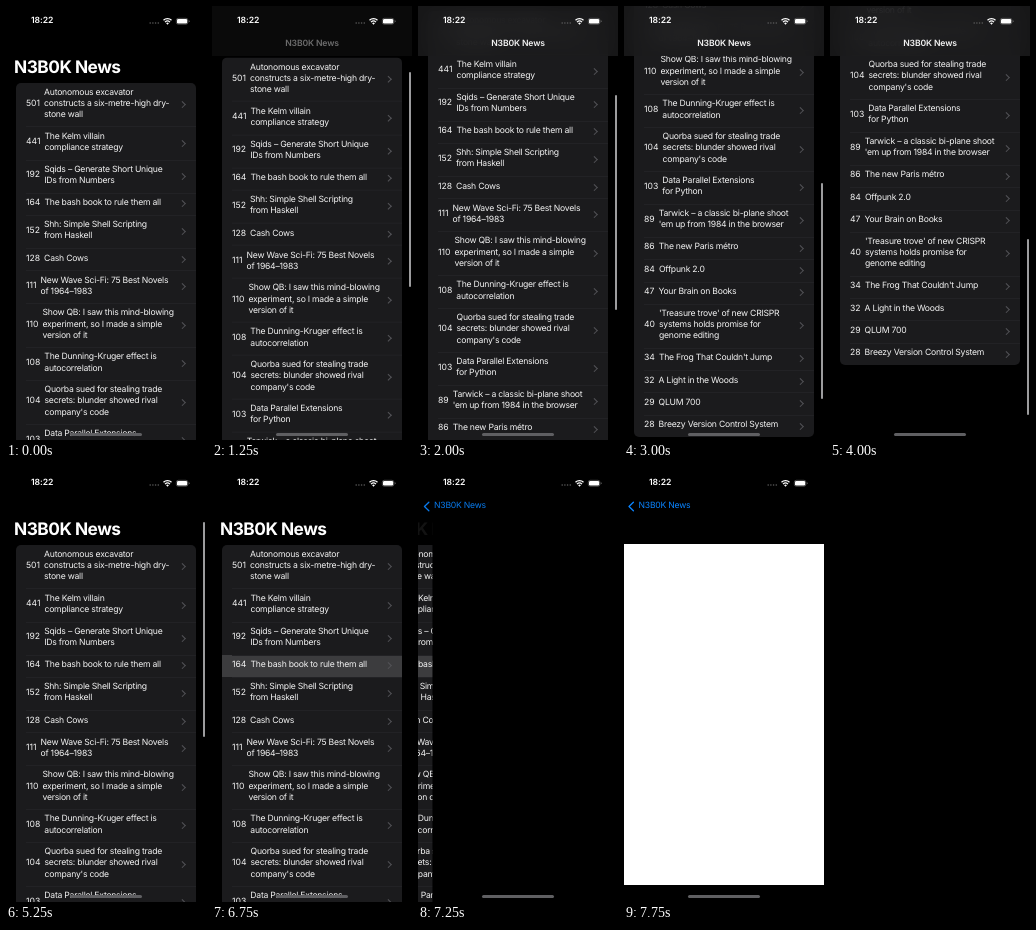
These frames come from a looping animation (200x434 px, 8 s). An HTML page:

```html
<!DOCTYPE html>
<html lang="en">
<head>
<meta charset="utf-8">
<title>News list</title>
<style>
  html, body { margin: 0; width: 100%; height: 100%; overflow: hidden; background: #000; }
  body {
    font: 8.65px/11.2px Inter, Roboto, sans-serif;
    letter-spacing: -.235px;
    color: #f4f4f4;
    text-rendering: geometricPrecision;
    white-space: nowrap;
  }
  div, svg { position: absolute; }
  #stage { left: 0; top: 0; width: 200px; height: 434px; overflow: hidden; background: #000; }
  #page, #detail { left: 0; top: 0; width: 200px; height: 434px; }
  #list { left: 10px; top: 76.8px; width: 180px; border-radius: 5px; overflow: hidden; background: #1b1b1d; }
  .row { position: relative; display: flex; align-items: center; box-sizing: border-box; padding-left: 10px; gap: 4px; }
  .row + .row::before { content: ""; position: absolute; left: 10px; right: 0; top: 0; height: .5px; background: #222225; }
  .row b { font-weight: 400; letter-spacing: 0; }
  .row i {
    position: absolute; right: 11.7px; top: 50%; width: 3.6px; height: 3.6px; margin-top: -2.4px;
    border: solid #535357; border-width: 1px 1px 0 0; transform: rotate(45deg);
  }
  .row.on { background: #3c3c3e; }
  #bar { left: 196.5px; width: 2px; border-radius: 1px; background: #9c9c9e; }
  #head {
    left: 0; top: 0; width: 200px; height: 50px;
    background: rgba(28, 28, 29, .84); backdrop-filter: blur(10px);
  }
  #head div { left: 0; width: 200px; top: 33px; text-align: center; font-weight: 600; letter-spacing: -.14px; }
  #clip { left: 0; top: 50px; width: 200px; height: 26px; overflow: hidden; }
  #big { left: 8px; top: 1.4px; font-size: 17.3px; line-height: 22px; font-weight: 700; letter-spacing: -.5px; color: #fff; }
  #detail { background: #000; }
  #web { left: 0; top: 76px; width: 200px; height: 341px; background: #fff; }
  #back { left: 0; top: 33px; width: 100px; height: 11px; color: #0a84ff; }
  #back div { left: 14.6px; top: 0; }
  #clock { left: 25px; top: 9.8px; font-weight: 600; letter-spacing: -.08px; color: #fff; }
  #home { left: 64px; top: 427.3px; width: 72px; height: 2.6px; border-radius: 2px; background: #5f5f62; }
</style>
</head>
<body>
<div id="stage">
  <div id="page">
    <div id="list"></div>
    <div id="bar"></div>
    <div id="head"><div>N3B0K News</div></div>
    <div id="clip"><div id="big">N3B0K News</div></div>
  </div>
  <div id="detail"><div id="web"></div></div>
  <div id="back">
    <svg width="14" height="11" fill="none" stroke="#0a84ff" stroke-width="1.3" stroke-linecap="round" stroke-linejoin="round">
      <path d="M9.4 1.2 5 5.5 9.4 9.8"/>
    </svg>
    <div>N3B0K News</div>
  </div>
  <div id="clock">18:22</div>
  <svg style="left:140px;top:8px" width="50" height="14" fill="none">
    <path d="M4.2 9h0m2.7 0h0m2.7 0h0m2.7 0h0" stroke="#5a5a5a" stroke-width="1.6" stroke-linecap="round"/>
    <path d="M17.5 6.3a5.6 5.6 0 0 1 8 0M19 8.1a3.6 3.6 0 0 1 5 0" stroke="#fff" stroke-width="1.3"/>
    <path d="M20.1 9.2 21.5 10.7 22.9 9.2a2 2 0 0 0-2.8 0z" fill="#fff"/>
    <rect x="30.3" y="4.3" width="11.6" height="5.9" rx="1.9" stroke="#777" stroke-width=".6"/>
    <rect x="31" y="5" width="10.2" height="4.5" rx="1.3" fill="#fff"/>
    <path d="M42.9 6.2v2.1q.8-.4.8-1.05t-.8-1.05z" fill="#777"/>
  </svg>
  <div id="home"></div>
</div>
<script>
const STORIES = `501|Autonomous excavator|constructs a six-metre-high dry-|stone wall
441|The Kelm villain|compliance strategy
192|Sqids – Generate Short Unique|IDs from Numbers
164|The bash book to rule them all
152|Shh: Simple Shell Scripting|from Haskell
128|Cash Cows
111|New Wave Sci-Fi: 75 Best Novels|of 1964–1983
110|Show QB: I saw this mind-blowing|experiment, so I made a simple|version of it
108|The Dunning-Kruger effect is|autocorrelation
104|Quorba sued for stealing trade|secrets: blunder showed rival|company's code
103|Data Parallel Extensions|for Python
89|Tarwick – a classic bi-plane shoot|'em up from 1984 in the browser
86|The new Paris métro
84|Offpunk 2.0
47|Your Brain on Books
40|'Treasure trove' of new CRISPR|systems holds promise for|genome editing
34|The Frog That Couldn't Jump
32|A Light in the Woods
29|QLUM 700
28|Breezy Version Control System`;

const LOOP = 8000, TICK = 250, MAX_SCROLL = 285;
// [time, scroll offset]
const SCROLL = [[750, 0], [2000, 72], [3000, 253], [3400, 265], [4000, 325], [4500, 285], [5250, 0]];

const $ = id => document.getElementById(id);
const clamp = x => Math.min(1, Math.max(0, x));
const smooth = x => x * x * (3 - 2 * x);

$('list').innerHTML = STORIES.split('\n').map(story => {
  const [points, ...lines] = story.split('|');
  const height = 22.4 + 10.64 * (lines.length - 1);
  return `<div class="row" style="height:${height}px"><b>${points}</b><span>${lines.join('<br>')}</span><i></i></div>`;
}).join('');
const picked = $('list').children[3];

function scrollAt(t) {
  let y = 0;
  for (let i = 1; i < SCROLL.length; i++) {
    const [t0, y0] = SCROLL[i - 1], [t1, y1] = SCROLL[i];
    if (t >= t0) y = y0 + (y1 - y0) * smooth(clamp((t - t0) / (t1 - t0)));
  }
  return y;
}

// The bar shrinks while the list is pulled past its end.
function drawBar(t, y) {
  const over = Math.max(0, y - MAX_SCROLL);
  const bar = $('bar').style;
  bar.top = 53.5 + (y - over) * .49 + over + 'px';
  bar.height = 215.5 - over + 'px';
  bar.opacity = t < 1000 ? 0 : clamp((5750 - t) / 500);
}

function draw(t) {
  const y = scrollAt(t);
  $('list').style.transform = `translateY(${-y}px)`;
  $('big').style.transform = `translateY(${-y}px)`;
  $('head').style.opacity = clamp((y - 20) / 12);
  drawBar(t, y);

  picked.classList.toggle('on', t >= 6500);
  const push = 1 - (1 - clamp((t - 6900) / 600)) ** 3;
  $('page').style.transform = `translateX(${-60 * push}px)`;
  $('big').style.opacity = 1 - push;
  $('detail').style.transform = `translateX(${200 * (1 - push)}px)`;
  $('back').style.opacity = push;
  $('back').style.transform = `translateX(${20 * (1 - push)}px)`;
  $('web').style.visibility = t >= 7750 ? 'visible' : 'hidden';
}

const start = performance.now();
function frame() {
  const t = (performance.now() - start) % LOOP;
  draw(Math.floor(t / TICK) * TICK);
  requestAnimationFrame(frame);
}
frame();
</script>
</body>
</html>
```
